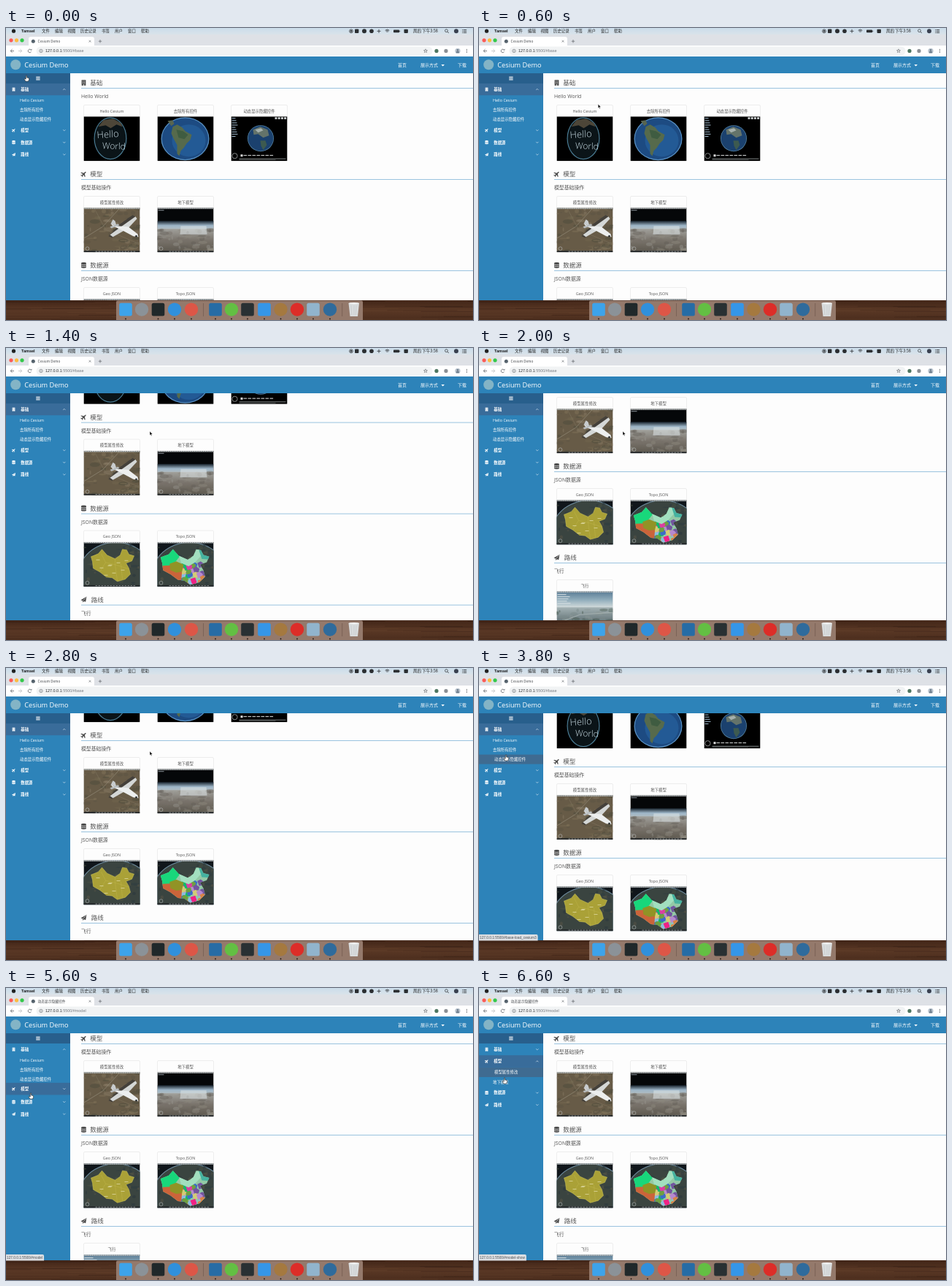
Write an HTML page with a canvas that moves like this. It is 640 px wide and 400 px high and loops after 6.7 s.

```html
<!DOCTYPE html>
<html lang="zh-CN">
<head>
<meta charset="utf-8">
<title>Cesium Demo</title>
<style>
html, body { margin: 0; width: 100%; height: 100%; overflow: hidden; background: #fff; }
canvas { display: block; width: 640px; height: 400px; }
</style>
</head>
<body>
<canvas id="stage"></canvas>
<script>
const LOOP = 6700, STEP = 100;
const PAGE = '"Open Sans", "Noto Sans CJK SC", "Noto Sans CJK", sans-serif';
const UI = '"Noto Sans CJK SC", "Noto Sans CJK", sans-serif';
const ARIAL = '"Liberation Sans", "Noto Sans CJK SC", sans-serif';
const BLUE = '#2d83b9', ACTIVE = '#396c9a', INK = '#4a4a4a';

const cv = document.getElementById('stage');
const dpr = window.devicePixelRatio || 1;
cv.width = 640 * dpr;
cv.height = 400 * dpr;
const c = cv.getContext('2d');

function rect(x, y, w, h, fill) { c.fillStyle = fill; c.fillRect(x, y, w, h); }
function round(x, y, w, h, r, fill) {
  c.beginPath(); c.roundRect(x, y, w, h, r); c.fillStyle = fill; c.fill();
}
function oval(x, y, rx, ry, fill) {
  c.beginPath(); c.ellipse(x, y, rx, ry, 0, 0, 7); c.fillStyle = fill; c.fill();
}
function dot(x, y, r, fill) { oval(x, y, r, r, fill); }
function path(p, closed) {
  c.beginPath();
  for (let i = 0; i < p.length; i += 2) c.lineTo(p[i], p[i + 1]);
  if (closed) c.closePath();
}
function poly(p, fill) { path(p, true); c.fillStyle = fill; c.fill(); }
function line(p, color, w = 1) { path(p); c.strokeStyle = color; c.lineWidth = w; c.stroke(); }
function ring(x, y, r, color, w, a = 0, b = 6.2832) {
  c.beginPath(); c.arc(x, y, r, a, b); c.strokeStyle = color; c.lineWidth = w; c.stroke();
}
// y is the visual centre of the line of text
function text(s, x, y, size, color, font = PAGE, weight = 400, align = 'left') {
  c.font = `${weight} ${size}px ${font}`;
  c.textAlign = align;
  c.fillStyle = color;
  c.fillText(s, x, y + size * 0.37);
}
function fade(y0, y1, ...stops) {
  const g = c.createLinearGradient(0, y0, 0, y1);
  stops.forEach((s, i) => g.addColorStop(i / (stops.length - 1), s));
  return g;
}
function within(x, y, w, h, draw) {
  c.save(); c.beginPath(); c.rect(x, y, w, h); c.clip(); draw(); c.restore();
}
function at(x, y, s, draw) { c.save(); c.translate(x, y); c.scale(s, s); draw(); c.restore(); }
function rng(seed) {
  return () => (seed = (seed * 16807) % 2147483647) / 2147483647;
}
function track(keys, t) {
  for (let i = 1; i < keys.length; i++) {
    const [t0, ...a] = keys[i - 1], [t1, ...b] = keys[i];
    if (t <= t1) return a.map((v, k) => v + (b[k] - v) * (t - t0) / (t1 - t0));
  }
  return keys[keys.length - 1].slice(1);
}

// ---- icons, drawn in a box of about 8 units
const icons = {
  book(col, bg) {
    rect(-3, -4, 6, 8, col);
    for (let y = -2.7; y < 2; y += 1.7) for (const x of [-1.6, 0.6]) rect(x, y, 1, 0.8, bg);
    rect(-0.6, 2.5, 1.2, 1.5, bg);
  },
  plane(col) {
    c.rotate(-0.785);
    poly([4.6, 0, 3.6, -0.8, 1.2, -0.8, -1, -4.2, -2, -4.2, -0.9, -0.8, -2.9, -0.8, -3.8, -2,
      -4.5, -2, -4, 0, -4.5, 2, -3.8, 2, -2.9, 0.8, -0.9, 0.8, -2, 4.2, -1, 4.2, 1.2, 0.8, 3.6, 0.8], col);
  },
  data(col, bg) {
    rect(-3.6, -3, 7.2, 6, col);
    oval(0, -3, 3.6, 1.2, col);
    oval(0, 3, 3.6, 1.2, col);
    for (const y of [-1.6, 0.8]) {
      c.beginPath(); c.ellipse(0, y, 3.7, 1.1, 0, 0, Math.PI);
      c.strokeStyle = bg; c.lineWidth = 0.7; c.stroke();
    }
  },
  send(col, bg) {
    poly([4.2, -4.2, -4.2, 0.6, -1.6, 1.7, -1.4, 4.2, 0.2, 2.4, 2.8, 3.4], col);
    line([3.6, -3.4, -1.2, 1.9], bg, 0.6);
  }
};
function icon(kind, x, y, s, col, bg) { at(x, y, s, () => icons[kind](col, bg)); }

// ---- thumbnails, 77 x 61
const W = 77, H = 61;
const LAND = [10, 20, 20, 16, 25, 10, 32, 18, 43, 23, 50, 18, 53, 10, 59, 11, 62, 17, 69, 19, 66, 26,
  58, 29, 62, 36, 64, 44, 57, 51, 46, 54, 39, 49, 31, 48, 22, 41, 13, 36, 12, 27];

function speckle(seed, n, y0, cols) {
  const r = rng(seed);
  for (let i = 0; i < n; i++) {
    c.globalAlpha = 0.45;
    oval(r() * W, y0 + r() * (H - y0), 1 + r() * 6, 0.6 + r() * 2.4, cols[i % cols.length]);
  }
  c.globalAlpha = 1;
}
function bars() {
  rect(0, 0, W, 1.6, '#c4c8c8');
  for (let x = 1; x < W; x += 3) rect(x, 0.4, 1.2, 0.8, '#555b60');
  rect(0, H - 2, W, 2, '#25292b');
  for (let x = 16; x < 70; x += 4) rect(x, H - 1.5, 2.6, 0.8, '#a7abab');
  ring(5, H - 5, 2.4, '#b9bcbc', 0.6);
}
function earth() {
  rect(0, 0, W, H, '#10161b');
  oval(44, 46, 52, 46, '#6f8da0');
  oval(44, 46, 51, 45, '#3a4440');
  speckle(31, 50, 3, ['#4f5443', '#2b3a40', '#5c5747', '#26343c']);
}
const thumbs = {
  hello() {
    rect(0, 0, W, H, '#000');
    oval(36.5, 30, 22.5, 29, '#4a7b93');
    oval(36.5, 30, 21.3, 27.8, '#0b1418');
    poly([20, 14, 27, 5, 40, 3, 51, 9, 53, 14, 45, 11, 37, 16, 30, 12], '#4d4638');
    c.save();
    c.rotate(-0.06);
    text('Hello', 16.5, 26, 13, '#cfe2ea', PAGE, 300);
    c.rotate(0.1);
    text('World', 27, 38.5, 12, '#cfe2ea', PAGE, 300);
    c.restore();
  },
  globe() {
    rect(0, 0, W, H, '#000');
    oval(38, 30.5, 33, 29.5, '#5a92c4');
    oval(38, 30.5, 31.8, 28.3, '#1d4b82');
    oval(43, 33, 23, 22, '#235a95');
    poly([21, 14, 27, 11, 34, 15, 38, 20, 47, 25, 45, 32, 40, 37, 36, 43, 32, 47, 30, 54, 27, 51,
      27, 39, 22, 30, 19, 23], '#566a4c');
    poly([26, 18, 35, 20, 42, 25, 37, 31, 29, 29], '#3f5c41');
    poly([14, 6, 21, 5, 23, 10, 19, 13], '#586550');
  },
  controls() {
    rect(0, 0, W, H, '#000');
    dot(40.5, 30, 18, '#54809f');
    dot(40.5, 30, 17.2, '#1b416e');
    poly([30, 18, 40, 14, 50, 18, 52, 26, 44, 29, 37, 24, 31, 25], '#64736a');
    poly([33, 18, 41, 16, 44, 19, 37, 22], '#a6b0ad');
    poly([40, 33, 47, 33, 49, 39, 44, 46, 41, 40], '#3d5a50');
    for (let i = 0; i < 9; i++) rect(1, 2 + i * 3.1, 5 + (i * 5) % 4, 1, '#9fb8cc');
    for (let i = 0; i < 4; i++) rect(60 + i * 4.2, 1, 3, 2.8, '#c8cccd');
    ring(5, 54, 3.6, '#a8aaaa', 0.8);
    rect(13, 52, 3, 3, '#ddd');
    for (let i = 0; i < 7; i++) rect(17 + i * 6, 52.7, 4.6, 1.2, '#bfc2c2');
    rect(11, 57.5, 64, 1, '#7f8585');
    rect(11, 59.2, 50, 0.6, '#5f6565');
  },
  model() {
    rect(0, 0, W, H, '#675b47');
    speckle(7, 90, 0, ['#83765b', '#4b4a3b', '#71664f', '#5a5344', '#8a7d66']);
    line([0, 42, 26, 26, 50, 0], '#8d8471', 0.8);
    line([14, 0, 30, 30, 77, 50], '#817761', 0.5);
    poly([34, 39, 50, 22, 67, 10, 71, 12, 61, 24, 39, 41], '#44403a');
    poly([36, 37, 54, 24, 71, 12, 73, 15, 61, 28, 40, 40], '#d4d7d6');
    poly([37, 22, 46, 25, 61, 26, 74, 36, 75, 40, 68, 39, 53, 31, 40, 25], '#eceeee');
    poly([37, 22, 40, 16, 43, 18, 45, 25], '#c8ccce');
    poly([36, 26, 47, 22, 49, 24, 38, 28], '#b8bdbf');
    dot(72, 39, 1.4, '#34383a');
    bars();
  },
  under() {
    rect(0, 0, W, H, '#050709');
    rect(0, 18, W, H - 18, fade(18, 31, '#17222c', '#9eb6c8', '#b5bdbe'));
    rect(0, 29, W, H - 29, fade(29, 60, '#a1a19c', '#79736b', '#5e594f'));
    speckle(19, 70, 30, ['#8d877d', '#625e57', '#96938d', '#777068']);
    c.globalAlpha = 0.55;
    poly([32, 25, 67, 25, 68, 36, 31, 36], '#dfe5e7');
    c.globalAlpha = 1;
    line([31, 36, 68, 36], '#c6cccd', 0.6);
    rect(1, 3, 8, 1, '#8a9298');
    bars();
  },
  geo() {
    earth();
    poly(LAND, '#aaa137');
    line(LAND.concat(LAND.slice(0, 2)), '#d1c95c', 0.5);
    for (const p of [[24, 16, 30, 28, 22, 41], [30, 28, 43, 31, 46, 53], [43, 23, 43, 31, 62, 37], [51, 30, 53, 51]])
      line(p, '#c2b94f', 0.4);
    for (let i = 0; i < 9; i++) rect(17 + (i * 17) % 40, 24 + (i * 7) % 24, 5, 0.8, '#ded9a0');
    bars();
  },
  topo() {
    earth();
    c.save();
    c.translate(-7, -1);
    c.scale(1.13, 1.1);
    path(LAND, true);
    c.clip();
    rect(0, 0, W, H, '#93c9a6');
    const r = rng(53);
    const cols = ['#3a6dc8', '#b689ce', '#13b96b', '#d78446', '#8cbdde', '#db3fa0', '#6f9f40', '#72549f', '#d3cc75'];
    for (let i = 0; i < 34; i++) {
      const x = 37 + r() * 26, y = 27 + r() * 26;
      poly([x - 4, y - 2, x, y - 4, x + 4, y - 1, x + 3, y + 3, x - 2, y + 4], cols[i % 9]);
    }
    poly([0, 0, 33, 0, 33, 19, 27, 27, 23, 31, 8, 32], '#18d77b');
    poly([5, 31, 22, 30, 36, 38, 35, 50, 0, 50], '#cb643a');
    poly([21, 28, 29, 25, 38, 29, 36, 38, 29, 39, 22, 36], '#919326');
    poly([32, 16, 46, 22, 56, 8, 60, 17, 52, 26, 44, 31, 35, 27], '#a2dfbf');
    poly([56, 9, 72, 9, 72, 23, 60, 22], '#45b2a0');
    poly([46, 47, 52, 45, 54, 51, 49, 55], '#f02284');
    c.restore();
    bars();
  },
  fly() {
    rect(0, 0, W, 24, fade(0, 23, '#587a94', '#8eabba', '#d7dedd'));
    rect(0, 22, W, 39, fade(22, 60, '#a4b2b4', '#66767a', '#4c5c55'));
    speckle(77, 70, 25, ['#55685f', '#7b8a8a', '#48594f', '#8a9693']);
    line([0, 44, 32, 32, 77, 29], '#b2bcba', 0.7);
    for (let i = 0; i < 5; i++) rect(1, 4 + i * 3, 12 + (i * 5) % 7, 1, '#d6dfe3');
    bars();
  }
};

const sections = [
  ['book', '基础', 'Hello World', [['Hello Cesium', 'hello'], ['去除所有控件', 'globe'], ['动态显示隐藏控件', 'controls']]],
  ['plane', '模型', '模型基础操作', [['模型属性修改', 'model'], ['地下模型', 'under']]],
  ['data', '数据源', 'JSON数据源', [['Geo JSON', 'geo'], ['Topo JSON', 'topo']]],
  ['send', '路线', '飞行', [['飞行', 'fly']]]
];

function content(scroll) {
  rect(88, 62, 552, 311, '#fdfdfd');
  within(88, 62, 552, 311, () => sections.forEach(([kind, name, sub, cards], i) => {
    const y = 75 + i * 125 - scroll;
    icon(kind, 106.5, y, 0.95, INK, '#fdfdfd');
    text(name, 115.3 + (i === 3 ? 1.5 : 0), y, 8.5, '#555');
    rect(103, y + 7, 537, 1, '#9ac3df');
    text(sub, 103, y + 18.7, 6.85, '#555');
    cards.forEach(([title, art], k) => {
      const x = 106.5 + k * 101;
      c.beginPath(); c.roundRect(x, y + 30.5, W, 76.5, 1.5);
      c.strokeStyle = '#e7e7e7'; c.lineWidth = 0.7; c.stroke();
      text(title, x + W / 2, y + 38.6, 5.4, '#555', PAGE, 400, 'center');
      at(x, y + 46.2, 1, () => within(0, 0, W, H, thumbs[art]));
    });
  }));
}

function chevron(y, up) {
  const d = up ? -0.8 : 0.8;
  line([78.2, y - d, 79.8, y + d, 81.4, y - d], '#d6e6f1', 0.7);
}
function menuRow(i, y, h, active, up) {
  if (active) rect(0, y, 88, h, ACTIVE);
  const mid = y + h / 2;
  icon(sections[i][0], 10.5, mid, 0.62, '#fff', active ? ACTIVE : BLUE);
  text(sections[i][1], 20.3, mid, 5.4, '#fff', PAGE, 600);
  chevron(mid, up);
}
function subRows(i, y, open, hover) {
  const items = sections[i][3], h = 13.2, full = items.length * h;
  within(0, y, 88, full * open, () => items.forEach(([name], k) => {
    if (k === hover) rect(0, y + k * h, 88, h, '#3f6b91');
    text(name, k === hover ? 21 : 19, y + (k + 0.5) * h, 5.4, '#fff', PAGE, 500);
  }));
  return full * open;
}
function sidebar(t) {
  rect(0, 62, 88, 311, BLUE);
  rect(0, 62, 88, 14, '#285f8c');
  for (let i = 0; i < 3; i++) rect(41.2, 66.6 + i * 1.9, 5.4, 1, '#fff');
  const p = Math.min(1, Math.max(0, (t - 5550) / 350));
  const open = 0.5 - Math.cos(p * Math.PI) / 2;
  let y = 76;
  menuRow(0, y, 16.2, t < 5500, t < 5700);
  y += 16.2;
  y += subRows(0, y, 1 - open, t >= 3600 && t < 5000 ? 2 : -1);
  menuRow(1, y, 16.6, t >= 5500, t >= 5700);
  y += 16.6;
  y += subRows(1, y, open, t >= 6100 ? 0 : -1);
  menuRow(2, y, 16.6);
  menuRow(3, y + 16.6, 16.6);
}

function menuBar() {
  rect(0, 0, 640, 9, fade(0, 9, '#cbdcea', '#d9e3ea'));
  dot(10.5, 4.2, 2.6, '#222');
  text('Tamsel', 21, 4.3, 5.5, '#151515', ARIAL, 700);
  [['文件', 49], ['编辑', 67], ['视图', 84.5], ['历史记录', 102], ['书签', 131], ['用户', 149], ['窗口', 167], ['帮助', 185]]
    .forEach(([s, x]) => text(s, x, 4.3, 5.4, '#222', UI, 500));
  const k = '#2b2e31';
  ring(473, 4.3, 2.4, k, 0.8);
  dot(473, 4.3, 1.2, k);
  round(478, 1.6, 5.4, 5.4, 1, k);
  dot(491, 4.3, 3, k);
  dot(501, 4.3, 2.8, k);
  line([508.5, 4.3, 513.5, 4.3], k, 0.8);
  line([511, 1.8, 511, 6.8], k, 0.8);
  for (const r of [1.4, 2.8, 4.2]) ring(522.5, 6.4, r, k, 0.8, -2.3, -0.84);
  round(531, 2.5, 8, 3.8, 0.8, k);
  rect(539.4, 3.6, 0.8, 1.6, k);
  round(545.5, 1.7, 5.4, 5.2, 0.8, k);
  text('周四 下午3:58', 558, 4.3, 5.5, '#222', UI);
  ring(603.5, 3.7, 1.9, k, 0.7);
  line([605, 5.2, 606.8, 7], k, 0.8);
  dot(617, 4.3, 3, '#39404f');
  for (let i = 0; i < 3; i++) {
    rect(625, 2 + i * 2, 0.8, 0.8, k);
    rect(626.6, 2 + i * 2, 4.6, 0.8, k);
  }
}
function browser(title, hash) {
  rect(0, 9, 640, 15, '#dee1e6');
  ['#fc5b57', '#fdbc40', '#34c84a'].forEach((col, i) => dot(7 + i * 7.5, 16.8, 2.6, col));
  round(31, 12, 90, 14, 3, '#fff');
  dot(37.3, 18.2, 2.5, '#56636d');
  text(title, 43.6, 18.2, 4.75, '#44484c', UI);
  const g = '#5f6368';
  line([113.6, 16.8, 116.4, 19.6], g, 0.6);
  line([116.4, 16.8, 113.6, 19.6], g, 0.6);
  line([126.8, 18.2, 131.2, 18.2], g, 0.7);
  line([129, 16, 129, 20.4], g, 0.7);

  rect(0, 24, 640, 15, '#fff');
  line([8.6, 29, 6.2, 31.4, 8.6, 33.8], g, 0.8);
  line([6.2, 31.4, 11, 31.4], g, 0.8);
  line([19.4, 29, 21.8, 31.4, 19.4, 33.8], '#bbbec2', 0.8);
  line([17, 31.4, 21.8, 31.4], '#bbbec2', 0.8);
  ring(32.5, 31.4, 2.3, g, 0.8, 0.5, 5.6);
  poly([33.4, 30.6, 35.4, 30.6, 35.4, 28.6], g);
  round(41.5, 25.6, 543, 11.6, 5.8, '#f1f3f4');
  ring(48, 31.4, 2.2, g, 0.6);
  rect(47.7, 31, 0.6, 1.6, g);
  rect(47.7, 30, 0.6, 0.6, g);
  text('127.0.0.1', 54, 31.4, 5.45, '#25282b', ARIAL);
  const w = c.measureText('127.0.0.1').width;
  text(':5500/' + hash, 54 + w, 31.4, 5.45, '#777b80', ARIAL);
  const star = [];
  for (let i = 0; i < 11; i++) {
    const r = i % 2 ? 1.1 : 2.6, a = i * Math.PI / 5 - Math.PI / 2;
    star.push(575 + r * Math.cos(a), 31.4 + r * Math.sin(a));
  }
  line(star, g, 0.6);
  dot(590, 31.4, 2.6, '#4d7661');
  dot(603, 31.4, 2.6, '#8b9095');
  dot(619, 31.4, 3.6, '#b9c4ce');
  dot(619, 30.4, 1.3, '#6d7c8b');
  round(616.9, 32, 4.2, 2, 1, '#6d7c8b');
  for (let i = -1; i < 2; i++) dot(631.5, 31.4 + i * 2, 0.6, g);
}
function header() {
  rect(0, 39, 640, 23, BLUE);
  dot(13.2, 50.3, 7, '#83b4c6');
  text('Cesium Demo', 25.3, 50.3, 9.2, '#fff');
  text('首页', 537, 51, 6, '#fff', PAGE, 500);
  text('展示方式', 568, 51, 6, '#fff', PAGE, 500);
  poly([596.4, 50, 601, 50, 598.7, 52.6], '#fff');
  text('下载', 619, 51, 6, '#fff', PAGE, 500);
}
function dock() {
  rect(0, 373, 640, 27, fade(373, 400, '#402417', '#5a3825', '#4b2d1d'));
  const r = rng(11);
  for (let i = 0; i < 40; i++) {
    rect(r() * 640 - 40, 374 + r() * 26, 40 + r() * 110, 0.6, i % 2 ? 'rgba(120,80,55,.3)' : 'rgba(25,12,8,.3)');
  }
  round(151, 373.5, 338, 30, 2, '#94796b');
  const apps = [[164, '#3da3ea'], [186, '#8b9298', 1], [208.5, '#20282a'], [231, '#3090dc', 1], [254, '#dd5647', 1],
    [287, '#266ca5'], [309, '#63bf43', 1], [331, '#293033'], [354, '#3596e8'], [376.5, '#a5793f', 1],
    [399, '#dc2d28', 1], [421, '#91b4cd'], [444, '#2f6b9c', 1]];
  apps.forEach(([x, col, circle], i) => {
    if (circle) dot(x, 385.6, 9.2, col);
    else round(x - 8.8, 376.8, 17.6, 17.6, 2.5, col);
    if (i !== 1) dot(x, 398.4, 0.9, '#1c1512');
  });
  for (const x of [270, 460.5]) rect(x, 377, 0.6, 18, '#6c554a');
  poly([469.5, 377, 484, 377, 482, 395, 471.5, 395], '#d9dcdd');
  oval(476.8, 377.2, 7.3, 1.3, '#f0f1f1');
  for (const x of [473, 477, 480]) line([x, 380, x + (477 - x) * 0.2, 393], '#bfc3c5', 0.5);
}
function status(s) {
  c.font = `4.8px ${ARIAL}`;
  const w = c.measureText(s).width;
  round(-2, 365, w + 5, 8.5, [0, 2, 0, 0], '#dcdfe3');
  text(s, 1, 369.2, 4.8, '#53575b', ARIAL);
}
function pointer(x, y, hand) {
  c.save();
  c.translate(x, y);
  if (hand) {
    path([-0.6, 0, 0.6, 0, 0.7, 3, 3.4, 3.6, 3.6, 5.4, 2.6, 8, -1.2, 8, -3, 5, -2.4, 4.2, -0.8, 5.2], true);
    c.fillStyle = '#fff';
    c.strokeStyle = '#222';
    c.lineWidth = 0.6;
  } else {
    path([0, 0, 0, 5.6, 1.2, 4.5, 2.1, 6.5, 3, 6.1, 2.1, 4.2, 3.8, 4.1], true);
    c.fillStyle = '#000';
    c.strokeStyle = '#fff';
    c.lineWidth = 0.5;
  }
  c.fill();
  c.stroke();
  c.restore();
}

const scrollKeys = [[0, 0], [700, 0], [1000, 47], [1500, 120], [2000, 163], [2200, 170], [2400, 163],
  [2800, 108], [3100, 72], [4399, 72], [4400, 43], [5499, 43], [5500, 131], [6700, 131]];
const mouseKeys = [[0, 28, 65], [200, 28, 65], [700, 197, 114], [3100, 197, 114], [3600, 37, 119],
  [4700, 37, 119], [5200, 34, 144], [5800, 34, 144], [6200, 35, 123], [6700, 35, 123]];

function draw(t) {
  c.setTransform(dpr, 0, 0, dpr, 0, 0);
  const opened = t >= 4400;
  const hash = t >= 5500 ? '#model' : opened ? '#base-load_cesium3' : '#base';
  menuBar();
  browser(opened ? '动态显示隐藏控件' : 'Cesium Demo', hash);
  header();
  content(track(scrollKeys, t)[0]);
  sidebar(t);
  dock();
  const link = t >= 6100 ? '#model-show' : t >= 5000 ? '#model' : t >= 3600 ? '#base-load_cesium3' : '';
  if (link) status('127.0.0.1:5500/' + link);
  const [x, y] = track(mouseKeys, t);
  pointer(x, y, x < 88);
}

const start = performance.now();
function tick() {
  const t = (performance.now() - start) % LOOP;
  draw(Math.floor(t / STEP) * STEP);
  requestAnimationFrame(tick);
}
tick();
</script>
</body>
</html>
```
